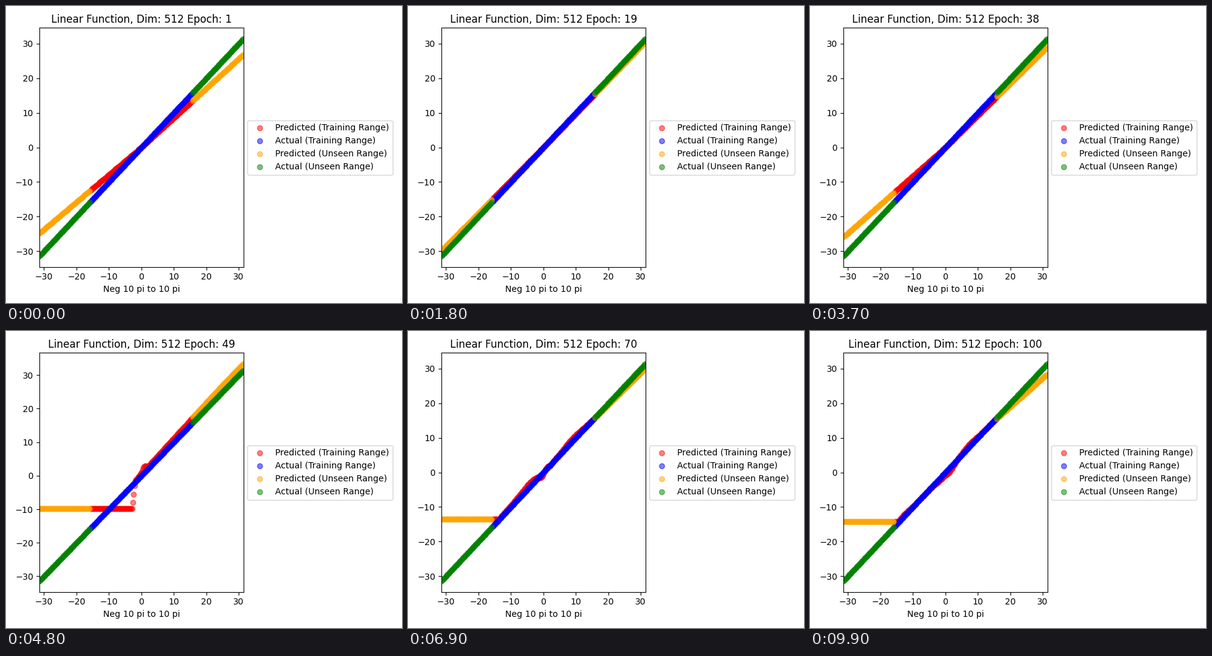
Write a matplotlib script that moves like this. It is 640 px wide and 480 px high and loops after 10000 ms.

```python
import numpy as np
import matplotlib.pyplot as plt
from matplotlib.animation import FuncAnimation

EPOCHS = 100
SPAN = 10 * np.pi
BREAK = 44  # first epoch whose fit is bent instead of straight

x = np.linspace(-SPAN, SPAN, 252)
train = np.abs(x) <= SPAN / 2
unseen = ~train


def bell(v, center, width, height=1):
    return height * np.exp(-((v - center) / width) ** 2)


def straight(t):
    """Two slopes meeting at zero, drifting and overshooting now and then."""
    keys = [0, 6, 18, 28, 37, 43]
    left = np.interp(t, keys, [0.79, 0.99, 0.95, 1.04, 0.825, 0.97])
    right = np.interp(t, keys, [0.855, 1.04, 0.972, 1.03, 0.925, 0.99])
    kick = bell(t % 26, 15, 0.8)
    return x * np.where(x < 0, left + 0.24 * kick, right + 0.06 * kick)


def ripple(*bells):
    return sum(bell(x, *b) for b in bells)


# Deviations from the diagonal as (center, width, height)
STAGES = [48, 56, 81, 99]
RIPPLES = [
    ripple((20, 20, 1.5), (0.9, 0.8, 1.2)),
    ripple((-5.5, 4, 1.1), (-0.6, 0.9, -2.2), (1.1, 0.7, 0.8),
           (2.2, 0.5, -0.7), (9, 4, 0.6)),
    ripple((-10, 5, 0.6), (-3.8, 2.5, 1.2), (9, 4, 1.1)),
    ripple((-13, 3, 0.5), (-2, 2, -0.5), (1.2, 2, -1.1), (7.5, 3, 0.7)),
]


def bent(t):
    """Rippled diagonal with a flat floor on the left."""
    k = int(np.clip(np.searchsorted(STAGES, t, side="right") - 1, 0, 2))
    u = np.clip((t - STAGES[k]) / (STAGES[k + 1] - STAGES[k]), 0, 1)
    tail = np.interp(t, [48, 56, 81, 84, 87, 90, 93, 96, 99],
                     [0.05, -0.1, -0.057, 0.1, -0.07, -0.1, 0.02, -0.1, -0.17])
    y = x + (1 - u) * RIPPLES[k] + u * RIPPLES[k + 1]
    y += tail * np.maximum(x - 14, 0)
    cliff = 9.6 * (x + 1.85 + 1.5 * max(t - STAGES[0], 0)) - 0.4
    floor = np.interp(t, STAGES, [-9.8, -12.8, -14.2, -14.2])
    return np.maximum(np.minimum(y, cliff), floor)


def predict(t):
    return straight(t) if t < BREAK else bent(t)


fig, ax = plt.subplots(figsize=(6.4, 4.8), dpi=100)


def dots(mask, y, color, label):
    return ax.scatter(x[mask], y[mask], color=color, alpha=0.5, label=label)


start = predict(0)
fit_train = dots(train, start, "red", "Predicted (Training Range)")
dots(train, x, "blue", "Actual (Training Range)")
fit_unseen = dots(unseen, start, "orange", "Predicted (Unseen Range)")
dots(unseen, x, "green", "Actual (Unseen Range)")
ax.set_xlim(-SPAN, SPAN)
ax.set_xlabel("Neg 10 pi to 10 pi")
ax.legend(loc="center left", bbox_to_anchor=(1, 0.5))


def update(t):
    y = predict(t)
    fit_train.set_offsets(np.c_[x[train], y[train]])
    fit_unseen.set_offsets(np.c_[x[unseen], y[unseen]])
    low, high = min(y.min(), -SPAN), max(y.max(), SPAN)
    pad = 0.05 * (high - low)
    ax.set_ylim(low - pad, high + pad)
    ax.set_title(f"Linear Function, Dim: 512 Epoch: {t + 1}")


update(0)
fig.tight_layout()
fig.subplots_adjust(top=1 - 35.4 / 480, right=fig.subplotpars.right - 0.4 / 640)
anim = FuncAnimation(fig, update, frames=EPOCHS, interval=100,
                     init_func=lambda: update(0), repeat=True, repeat_delay=0)
plt.show()
```
